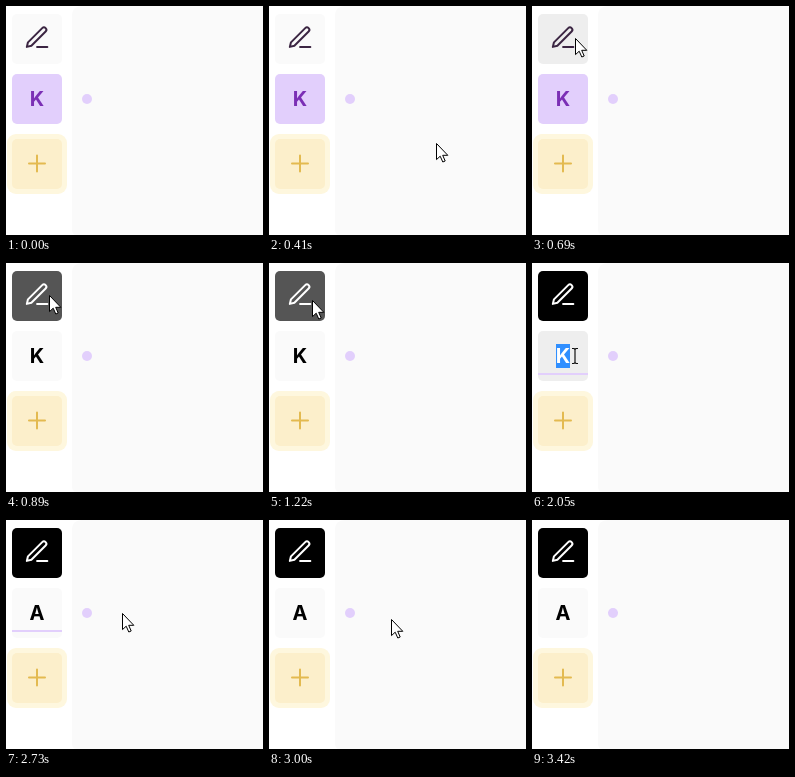
Recreate the animation shown at these times as an HTML page. Size 257 by 229 pixels, loop 3.7 s.

```html
<!DOCTYPE html>
<html lang="en">
<head>
<meta charset="utf-8">
<title>Rename a label</title>
<style>
  html, body { margin: 0; width: 100%; height: 100%; overflow: hidden; background: #fff; }
  svg { display: block; width: 257px; height: 229px; }
  text { font: 700 20px Inter, "Open Sans", sans-serif; text-anchor: middle; }
  .line { fill: none; stroke-linecap: round; stroke-linejoin: round; }
  .pointer { fill: #fff; stroke: #000; stroke-width: 1; stroke-linejoin: round; }
  #halo { mix-blend-mode: multiply; }
</style>
</head>
<body>
<svg viewBox="0 0 257 229">
  <rect width="257" height="229" fill="#fff"/>
  <path d="M257 0H76Q66 0 66 10V224Q66 229 71 229H257Z" fill="#fafafa"/>
  <circle cx="81" cy="93" r="5" fill="#e2cffc"/>

  <rect id="penBox" x="6" y="8" width="50" height="50" rx="5"/>
  <g id="pen" class="line" transform="translate(17.4 18.1) scale(1.14)" stroke-width="1.75">
    <path d="M12 20h9M16.5 3.5a2.12 2.12 0 0 1 3 3L7 19l-4 1 1-4Z"/>
  </g>

  <rect id="tagBox" x="6" y="68" width="50" height="50" rx="5"/>
  <rect id="underline" x="6" y="110" width="50" height="2" fill="#e2cffc"/>
  <rect id="selection" x="24" y="81" width="14" height="24" fill="#308fff"/>
  <text id="tag" x="31" y="100">K</text>

  <rect x="1" y="128" width="60" height="60" rx="9" fill="#fef7de"/>
  <rect x="6" y="133" width="50" height="50" rx="5" fill="#fcefcb"/>
  <path class="line" d="M23 157.5H39M31 149.5V165.5" stroke="#e3ba50" stroke-width="2"/>

  <circle id="halo" r="12" fill="#fffb66"/>
  <path id="arrow" class="pointer" d="M.5.5V16.6L4.2 13.2 6.8 19 9.2 18 6.7 12.3H11.8Z"/>
  <path id="hand" class="pointer" d="M-1.5 13V1.5A1.6 1.6 0 0 1 1.7 1.5V7.5Q3.7 6.3 4.8 8.3Q6.8 7.3 7.6 9.3Q10 8.6 10 11.5V15.5L8 20V22.5H-.8V20L-5.8 13.5Q-7 11-5 10.6Q-3.4 10.6-1.5 13ZM1.7 7.5V11M4.8 8.3V11.5M7.6 9.3V12"/>
  <path id="beam" d="M-3 -7.5H-1L0 -6.5 1 -7.5H3M0 -6.5V6.5M-3 7.5H-1L0 6.5 1 7.5H3" fill="none" stroke="#111" stroke-width="1.2"/>
</svg>
<script>
const LOOP = 3700;
const $ = id => document.getElementById(id);
const within = (t, from, to) => t >= from && t < to;
const ease = p => p < .5 ? 2 * p * p : 1 - 2 * (1 - p) * (1 - p);

// start, arrival, first and last point, steps, whether the first step already moves
const moves = [
  [200, 690, [239, 198], [43, 32], 7, 0],
  [1150, 1450, [43, 32], [40, 92], 5, 1],
  [2380, 2730, [43, 93], [116, 93], 6, 1],
  [3000, 3420, [116, 93], [262, 236], 7, 1]
];

function pointerAt(t) {
  const move = moves.filter(m => t >= m[0]).pop();
  if (!move) return [-50, -50];
  const [start, end, a, b, steps, lead] = move;
  const step = Math.floor((t - start) / (end - start) * (steps - lead) + .01) + lead;
  const p = ease(Math.min(1, step / steps));
  return a.map((v, i) => Math.round(v + (b[i] - v) * p));
}

function show(id, on) {
  $(id).style.display = on ? "" : "none";
}

function place(id, x, y) {
  $(id).setAttribute("transform", `translate(${x} ${y})`);
}

function paint(id, name, color) {
  $(id).setAttribute(name, color);
}

function draw(t) {
  const editing = within(t, 1590, 2380);
  const [x, y] = editing ? [43, 93] : pointerAt(t);
  const visible = within(t, 200, 3420);
  const over = top => visible && x >= 6 && x < 56 && y >= top && y < top + 50;
  const active = t >= 890;
  const overTag = over(68);
  const selected = within(t, 2050, 2120);

  paint("penBox", "fill", active ? (over(8) ? "#555" : "#000") : (over(8) ? "#eee" : "#fafafa"));
  paint("pen", "stroke", active ? "#fff" : "#3b2542");
  paint("tagBox", "fill", !active ? "#e2cffc" : overTag ? "#eee" : "#fafafa");
  paint("tag", "fill", selected ? "#fff" : active ? "#000" : "#7b2fb5");
  $("tag").textContent = t < 2120 ? "K" : "A";

  show("underline", within(t, 1590, 2870));
  show("selection", selected);
  show("halo", within(t, 760, 890) || within(t, 1450, 1590) || within(t, 2800, 2870));
  place("halo", overTag ? x - 1 : x, y);

  // The pointer hides while typing
  const beam = overTag && t >= 1590;
  const hand = overTag && active && !beam;
  show("beam", beam && !within(t, 2120, 2380));
  show("hand", hand);
  show("arrow", visible && !beam && !hand);
  for (const id of ["arrow", "hand", "beam"]) place(id, x, y);
}

const origin = performance.now();
function tick() {
  draw((performance.now() - origin) % LOOP);
  requestAnimationFrame(tick);
}
tick();
</script>
</body>
</html>
```
